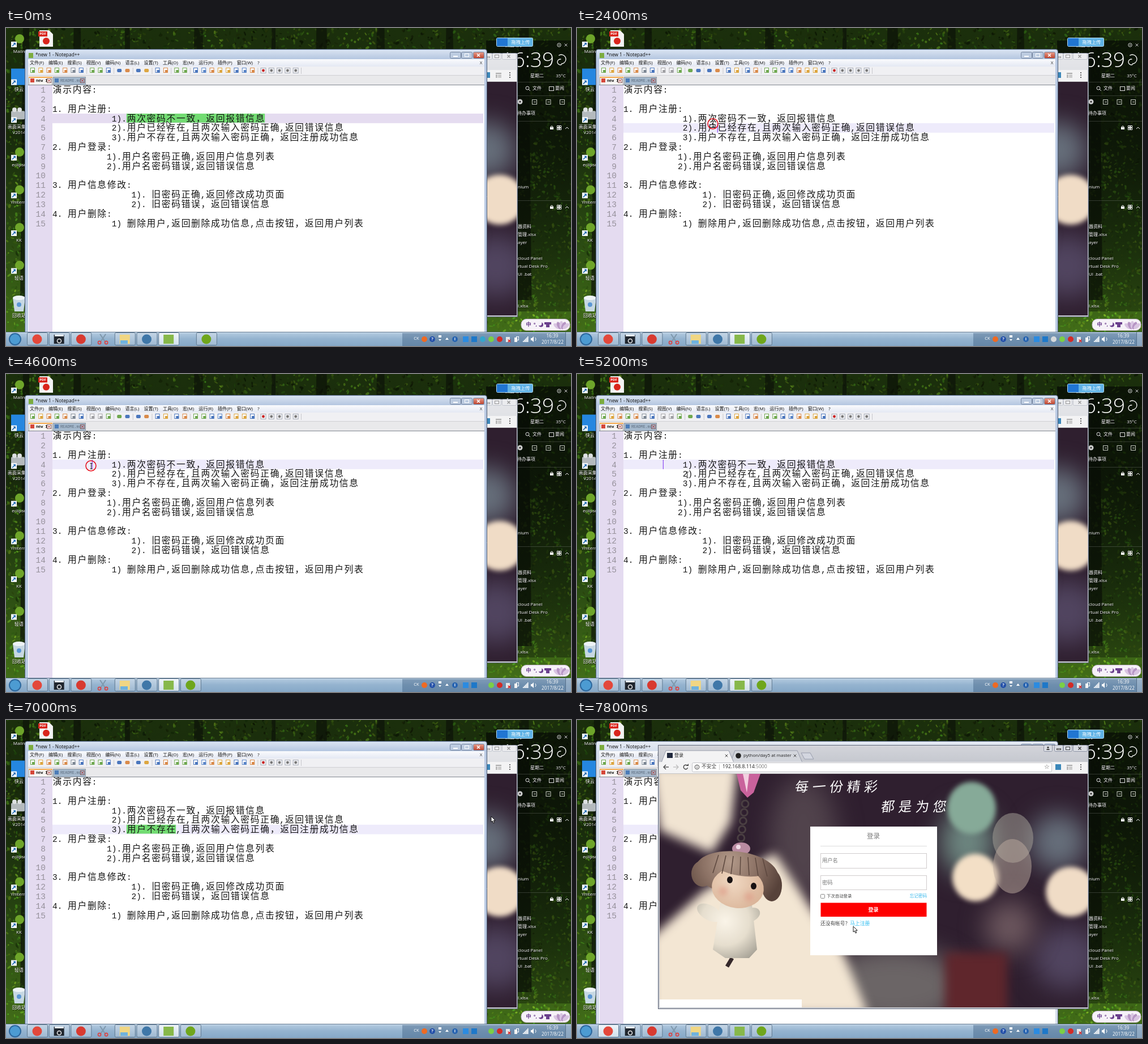
Write an HTML page with a canvas that moves like this. It is 998x561 px and loops after 8000 ms.

```html
<!DOCTYPE html>
<html lang="zh-CN">
<head>
<meta charset="utf-8">
<style>
html, body { margin: 0; width: 100%; height: 100%; overflow: hidden; background: #1c3010; }
canvas { display: block; width: 100vw; height: 100vh; }
</style>
</head>
<body>
<canvas id="stage" width="998" height="561"></canvas>
<script>
const W = 998, H = 561, LOOP = 8000, STEP = 200;
const UI = '"Open Sans", "Noto Sans CJK SC", "Noto Sans CJK", sans-serif';
const MONO = '"Liberation Mono", "Noto Sans CJK SC", "Noto Sans CJK", monospace';
const CELL = 8.725, ROW = 16.82, LEFT = 82, TOP = 100.6;
let g = document.getElementById('stage').getContext('2d');

// ---- helpers ----
function rect(x, y, w, h, c) { g.fillStyle = c; g.fillRect(x, y, w, h); }
function frame(x, y, w, h, c) { g.strokeStyle = c; g.lineWidth = 1; g.strokeRect(x + .5, y + .5, w - 1, h - 1); }
function oval(x, y, rx, ry, c, turn = 0) {
  g.fillStyle = c; g.beginPath(); g.ellipse(x, y, rx, ry, turn, 0, 7); g.fill();
}
function dot(x, y, r, c) { oval(x, y, r, r, c); }
function arc(x, y, r, c, w = 1, from = 0, to = 7) {
  g.strokeStyle = c; g.lineWidth = w; g.beginPath(); g.arc(x, y, r, from, to); g.stroke();
}
function trace(p) {
  g.beginPath();
  for (let i = 0; i < p.length; i += 2) g.lineTo(p[i], p[i + 1]);
}
function line(c, w, ...p) { g.strokeStyle = c; g.lineWidth = w; trace(p); g.stroke(); }
function poly(c, ...p) { g.fillStyle = c; trace(p); g.fill(); }
function round(x, y, w, h, r, c, edge) {
  g.beginPath(); g.roundRect(x, y, w, h, r);
  g.fillStyle = c; g.fill();
  if (edge) { g.strokeStyle = edge; g.lineWidth = 1; g.stroke(); }
}
function cross(x, y, r, c, w = 1) {
  line(c, w, x - r, y - r, x + r, y + r);
  line(c, w, x - r, y + r, x + r, y - r);
}
function text(s, x, y, size, c, align = 'left', weight = 400, family = UI) {
  g.font = `${weight} ${size}px ${family}`;
  g.textAlign = align; g.textBaseline = 'middle'; g.fillStyle = c;
  g.fillText(s, x, y);
  return g.measureText(s).width;
}
function label(s, x, y, align = 'center') {
  text(s, x + .6, y + .8, 8, '#000', align);
  text(s, x, y, 8, '#fff', align);
}
function stops(q, colors) {
  colors.forEach((c, i) => q.addColorStop(i / (colors.length - 1), c));
  return q;
}
function ramp(y0, y1, ...colors) { return stops(g.createLinearGradient(0, y0, 0, y1), colors); }
function ball(x, y, r, ...colors) { return stops(g.createRadialGradient(x, y, 0, x, y, r), colors); }
function blurred(px, draw) { g.save(); g.filter = `blur(${px}px)`; draw(); g.restore(); }
function randomizer(seed) { return () => (seed = (seed * 16807) % 2147483647) / 2147483647; }
function cached(draw) {
  const c = document.createElement('canvas'), old = g;
  c.width = W; c.height = H;
  g = c.getContext('2d'); draw(); g = old;
  return c;
}

// ---- desktop ----
function forest() {
  const rnd = randomizer(77);
  rect(0, 0, W, H, ramp(0, H, '#1b2f0c', '#182a0c', '#2a4a12', '#457219'));
  for (let i = 0; i < 9000; i++) {
    const x = rnd() * W, y = rnd() * H, patch = Math.sin(x / 31) * Math.sin(y / 37 + x / 90);
    const light = 15 + y / 32 + 9 * patch + (rnd() - .5) * 24;
    oval(x, y, 1 + rnd() * 3, .8 + rnd() * 1.6, `hsla(${80 + rnd() * 22},68%,${Math.max(4, light)}%,.7)`, rnd() * 3);
  }
  for (let x = 30; x < W; x += 50 + rnd() * 100) {
    const w = 6 + rnd() * 14;
    poly('rgba(12,18,8,.7)', x, 0, x + w, 0, x + w + 5, 480, x - 5, 480);
  }
}
function desktopIcons() {
  const names = ['Mailn', '快云', '画面采集大', 'eclipse', 'Ymterm', 'KK', '轻语', '回收站'];
  names.forEach((name, i) => {
    const y = 19 + i * 66.6;
    if (i === 1) rect(9, y - 14, 24, 29, '#2587e0');
    else if (i === 2) { round(9, y - 6, 24, 15, 2, '#b4babd'); dot(15, y - 8, 4, '#dde0e2'); dot(24, y - 8, 4, '#dde0e2'); }
    else if (i === 7) { poly('#c7d8e2', 12, 476, 34, 476, 31, 500, 15, 500); oval(23, 476, 11, 4, '#edf3f6'); dot(23, 488, 4, '#5b97d4'); }
    else dot(24, y, 8, '#6ea52a');
    if (i < 7) {
      rect(9, y + 5, 10, 10, '#f4f8fc');
      line('#1f68b0', 1.6, 11, y + 13, 16, y + 8);
      poly('#1f68b0', 12.5, y + 7, 17, y + 7, 17, y + 11.5);
    }
    label(name, 23, y + 23);
  });
  label('V2014', 23, 185);
  poly('#f3f3f3', 59, 4, 76, 4, 83, 11, 83, 33, 59, 33);
  rect(57, 6, 16, 9, '#d9251c'); text('PDF', 65, 10.5, 6, '#fff', 'center', 700);
  dot(71, 23, 6, '#d9251c');
}
function sidePanel() {
  rect(848, 22, 150, 478, ramp(22, 500, 'rgba(5,9,4,.7)', 'rgba(5,9,4,.55)', 'rgba(5,9,4,.35)'));
  text('16:39', 968, 59, 37, '#fff', 'right', 300, '"Open Sans", sans-serif');
  arc(977, 30, 3.2, '#ddd'); dot(977, 30, 1, '#ddd'); cross(989, 30, 2.4, '#ccc');
  arc(981, 55, 8, '#fff', 1.3, -2.2, 1.6); arc(979, 60, 5, '#fff', 1.3, 1, 5);
  label('星期二', 938, 85); label('35°C', 980, 85);
  arc(921, 106, 3, '#ddd'); line('#ddd', 1, 923, 108, 926, 111);
  label('文件', 938, 107);
  frame(959, 103, 9, 8, '#ddd'); label('要闻', 978, 107);
  for (const y of [95, 119, 164, 304]) rect(848, y, 150, 1, 'rgba(255,255,255,.16)');
  dot(908, 130, 4.5, '#ccc'); dot(908, 130, 1.5, '#222');
  for (let x = 929; x < 980; x += 24.5) { frame(x, 126, 9, 9, '#c4c8c0'); rect(x + 3, 130, 4, 1, '#ccc'); }
  label('待办事项', 919, 151);
  for (const y of [176, 316]) {
    rect(961, y - 1, 6, 4, '#fff'); arc(964, y - 1, 2, '#fff');
    for (let i = 0; i < 4; i++) frame(973 + i % 2 * 4, y - 4 + (i >> 1) * 4, 4, 4, '#eee');
    line('#eee', 1, 988, y + 2, 991, y - 1, 994, y + 2);
  }
  'nium/////器资料/管理.xlsx/ayer//cloud Panel/rtual Desk Pro/UI .bat////l.xlsx'.split('/')
    .forEach((s, i) => label(s, 904, 281 + i * 14, 'left'));
}
function floaters() {
  label('桌面助手', 898, 31);
  round(866.5, 17.5, 64, 15, 2, '#5fb2e6', '#b7dcf2');
  rect(867, 18, 19, 14, '#2176d2');
  text('拖拽上传', 909, 25.5, 8.2, '#fff', 'center');
  round(910, 513.5, 86, 20, 9, '#f6f2f8', '#c5b6cc');
  text('中', 923, 523.5, 9.5, '#6b3f8d', 'center', 700);
  text('°,', 935, 524, 9, '#6b3f8d', 'center', 700);
  dot(945, 523.5, 4, '#6b3f8d'); dot(943, 521.5, 3.4, '#f6f2f8');
  rect(951, 519, 12, 4, '#6b3f8d'); rect(954, 519, 6, 9, '#6b3f8d');
  for (let i = -2; i <= 2; i++) oval(981 + i * 4, 524 + Math.abs(i), 3.4, 7, i % 2 ? '#b695c4' : '#d9c4e2', i * .45);
}

// ---- browser ----
function photo() {
  g.save();
  g.beginPath(); g.rect(146, 95, 756, 412); g.clip();
  rect(146, 95, 756, 412, '#2f1f2f');
  blurred(22, () => {
    oval(400, 210, 60, 110, '#51434c');
    oval(560, 470, 130, 70, '#6b6566');
    oval(850, 215, 50, 50, '#67707c');
    oval(865, 420, 60, 55, '#514560');
    oval(765, 365, 45, 45, '#6c575e');
    oval(690, 215, 48, 60, '#6d8680');
  });
  blurred(9, () => {
    poly('#f1e4d2', 130, 80, 284, 80, 272, 180, 238, 235, 146, 195);
    poly('#f3e6d3', 130, 385, 225, 300, 350, 235, 412, 330, 470, 410, 515, 520, 130, 520);
    rect(650, 410, 110, 110, '#5f262c');
  });
  blurred(4, () => {
    oval(697, 155, 43, 46, '#86aa98');
    oval(704, 278, 41, 42, '#f3dfc6');
    oval(872, 303, 44, 44, '#f0dcc6');
  });
  oval(770, 208, 36, 44, 'rgba(170,165,156,.5)');
  oval(769, 258, 34, 48, 'rgba(190,172,160,.5)');
  doll();
  g.restore();
}
function doll() {
  const skin = ball(275, 285, 60, '#f0d8c2', '#d9b397'), eye = '#171112';
  const hair = ball(270, 250, 95, '#b39a8a', '#8c7265', '#57423a');
  const cloth = ball(262, 355, 85, '#faf4e8', '#e6dece', '#99958a');
  poly('#c9629c', 282, 95, 324, 95, 312, 128, 301, 137, 289, 124);
  poly('#f3cfe0', 293, 95, 304, 95, 300, 128);
  for (let i = 0; i < 5; i++) arc(297 - i * 1.8, 148 + i * 15, 6, '#4a3f42', 3);
  oval(290, 227, 16, 11, '#b98ba1'); dot(285, 224, 4, '#f0dce6');
  line('#34282a', 7, 265, 435, 274, 420);
  poly(cloth, 254, 318, 308, 318, 318, 405, 304, 420, 262, 420, 240, 405);
  oval(234, 340, 24, 13, cloth, .5); oval(306, 344, 18, 12, cloth, -.4);
  oval(282, 270, 74, 38, hair, .12);
  oval(222, 271, 20, 23, hair); oval(344, 292, 18, 28, hair);
  oval(284, 296, 46, 36, skin, .1);
  oval(290, 255, 52, 20, hair, .15);
  for (let i = 0; i < 7; i++) line('#5d483f', 1.5, 250 + i * 13, 238 + i, 240 + i * 16, 270 + i);
  oval(270, 282, 5, 6, eye); oval(312, 293, 5, 6, eye);
  blurred(5, () => { dot(258, 302, 8, 'rgba(222,150,130,.6)'); dot(304, 312, 8, 'rgba(222,150,130,.6)'); });
}
function handwriting(s, x, y) {
  [...s].forEach((ch, i) => {
    g.save(); g.translate(x + i * 30.5, y); g.transform(1, -.08, -.12, 1, 0, 0);
    text(ch, 0, 0, 24, '#fff', 'center', 300); g.restore();
  });
}
function tab(x, w, title, c) {
  const p = [x, 75, x + 8, 54, x + w - 9, 54, x + w, 75];
  poly(c, ...p); line('#989dac', 1, ...p);
  text(title, x + 23, 63, 8, '#222');
  if (title) cross(x + w - 13, 63, 2.3, '#444');
}
function field(y, h, hint) { frame(430, y, 188, h, '#d0cccd'); text(hint, 433, y + 13.5, 9.3, '#777'); }
function browserWindow() {
  const ink = '#444';
  rect(143, 44, 761, 466, '#60687a');
  rect(144, 45, 759, 464, ramp(45, 75, '#d3d4da', '#c5c8cf'));
  for (const x of [824, 843, 859, 876]) round(x + .5, 44.5, x > 870 ? 25 : 15, 11, 2, '#d9dce2', '#8e94a6');
  dot(832, 48.5, 1.7, ink); rect(829.5, 51, 5, 2, ink);
  frame(847, 50, 8, 3, ink); frame(863, 47, 8, 6, ink); cross(888, 50, 2.5, ink, 1.4);
  tab(271, 127, 'python/day5 at master', '#d3d6dc'); dot(285, 63, 4.8, '#222');
  tab(149, 128, '登录', '#f3f3f4'); rect(159, 58, 10, 9, '#20283c');
  poly('#d3d6df', 396, 58, 412, 58, 418, 69, 402, 69); line('#989dac', 1, 396, 58, 412, 58, 418, 69, 402, 69, 396, 58);
  rect(145, 74, 757, 21, '#f3f3f4');
  rect(145, 94, 757, 1, '#c6c6c8');
  for (const d of [1, -1]) {
    const x = 166 - 13 * d, c = d > 0 ? ink : '#bbb';
    line(c, 1.3, x, 83, x + 9 * d, 83); line(c, 1.3, x + 4 * d, 79, x, 83, x + 4 * d, 87);
  }
  arc(192, 83, 3.7, ink, 1.4, .3, 5.4); poly(ink, 193, 81, 197, 81, 197, 77);
  round(203.5, 75.5, 635, 16, 2, '#fff', '#c2c3c8');
  arc(212, 83, 3.8, ink); rect(211.5, 82, 1, 3, ink); rect(211.5, 80.5, 1, 1, ink);
  text('不安全', 220, 83, 8.7, ink); rect(251, 78, 1, 10, '#ccc');
  const host = text('192.168.8.114', 257, 83, 8.7, '#222');
  text(':5000', 257 + host, 83, 8.7, '#777');
  text('☆', 830, 83, 11, '#555', 'center', 400, '"DejaVu Sans", sans-serif');
  rect(845, 78, 10, 10, '#3b87b9');
  rect(865, 79, 10, 2, '#aaa'); rect(865, 82, 3, 6, '#bbb'); rect(869, 82, 6, 6, '#ccc');
  for (const y of [79, 83, 87]) dot(890, y, 1.1, ink);
  photo();
  handwriting('每一份精彩', 397, 120);
  handwriting('都是为您', 549, 155);
  rect(412, 188, 224, 227, '#fff');
  text('登录', 523.5, 206, 11.5, '#777', 'center');
  rect(430, 222, 188, 1, '#ddd');
  field(235, 27, '用户名'); field(274, 26, '密码');
  round(430.5, 307.5, 7, 7, 1, '#fff', '#888');
  text('下次自动登录', 441, 311.5, 7.4, ink);
  text('忘记密码', 618, 311.5, 7.6, '#38b8ec', 'right');
  rect(430.5, 322.5, 187, 24.5, '#fe0000');
  text('登录', 523.5, 335.5, 9, '#fff', 'center', 700);
  text('还没有帐号？', 430, 360, 8.7, ink);
  text('马上注册', 482, 360, 8.9, '#2cbcf0');
}

// ---- editor ----
const content = `演示内容:

1. 用户注册:
            1).两次密码不一致，返回报错信息
            2).用户已经存在,且两次输入密码正确,返回错误信息
            3).用户不存在,且两次输入密码正确，返回注册成功信息
2. 用户登录:
           1).用户名密码正确,返回用户信息列表
           2).用户名密码错误,返回错误信息

3. 用户信息修改:
                1). 旧密码正确,返回修改成功页面
                2). 旧密码错误，返回错误信息
4. 用户删除:
            1) 删除用户,返回删除成功信息,点击按钮，返回用户列表`.split('\n');
const menus = '文件(F) 编辑(E) 搜索(S) 视图(V) 编码(N) 语言(L) 设置(T) 工具(O) 宏(M) 运行(R) 插件(P) 窗口(W) ?'.split(' ');
const toolGroups = [7, 3, 2, 2, 2, 2, 8, 5];

function toolbar(sel) {
  const tones = ['#6fa84f', '#dda640', '#4a76bd', '#5b86c8', '#d98a4a', '#7d8794'], rnd = randomizer(9);
  let x = 47;
  toolGroups.forEach((count, group) => {
    for (let i = 0; i < count; i++, x += 14.3) {
      const c = group === 1 && i < 2 && !sel ? '#a0a0a4' : tones[Math.floor(rnd() * 6)];
      if (group === 7) { frame(x - 5, 70, 10, 10, '#a8aeba'); dot(x, 75, 2.4, i ? '#777' : '#c81e1e'); }
      else if (group === 2 || group === 3) round(x - 4, 72, 8, 6, 2, c);
      else { rect(x - 4, 70, 8, 9, '#fbfbfd'); frame(x - 4, 70, 8, 9, c); rect(x - 1, 74, 5, 5, c); }
    }
    rect(x - 5, 70, 1, 11, '#c8c8cc');
    x += 5.1;
  });
}
function fileTab(x, w, name, c, mark, ink, weight) {
  rect(x, 86, w, 14, c); frame(x, 86, w, 15, '#9399a0');
  rect(x + 3, 89, 7, 7, mark);
  text(name, x + 13, 93, 6.8, ink, 'left', weight, MONO);
  frame(x + w - 10, 89, 8, 8, '#8a5a5a'); cross(x + w - 6, 93, 2, '#b34040');
}
function winButton(x, hot) {
  round(x + .5, 42.5, 19, 11, 2, hot ? ramp(43, 54, '#e69a88', '#bc3c26') : '#bccbe0', '#7485a0');
}
function editor({ row, from, to, front }) {
  const sel = to > from, y0 = TOP + row * ROW;
  round(33.5, 37.5, 816, 520, 4, front ? '#b9c9e2' : '#d3dbea', '#4d5c74');
  rect(35, 39, 813, 16, front ? ramp(39, 55, '#d9e3f1', '#b4c6e0') : ramp(39, 55, '#e6ebf4', '#d5deec'));
  rect(40, 44, 8, 9, '#7cac3f');
  text('*new 1 - Notepad++', 52, 48, 8.4, '#111');
  for (const x of [784, 804, 825]) winButton(x, front && x > 820);
  rect(790, 49, 8, 2, '#fff'); frame(810, 45, 8, 6, '#fff'); cross(834.5, 48, 2.5, '#fff', 1.6);
  rect(39, 55, 806, 45, '#f0f0f3');
  rect(39, 55, 806, 13, ramp(55, 68, '#fafbfd', '#e4e8f3'));
  let x = 42;
  for (const m of menus) x += text(m, x, 61.5, 8, '#111') + 8.2;
  text('X', 839, 61.5, 8, '#333', 'center');
  toolbar(sel);
  rect(39, 83, 806, 17, '#e9e9eb'); rect(39, 83, 806, 1, '#d0d0d4');
  fileTab(40, 42, 'new 1', '#f7f5f3', '#d5473a', '#111', 700);
  rect(40, 86, 42, 2, '#f5a94c');
  fileTab(83, 58, 'README.md', '#a4b8cc', '#4b7cb8', '#5f6f80', 400);

  rect(39, 100, 806, 437, '#fff'); rect(39, 100, 806, 1, '#808690');
  rect(40, 101, 42, 436, '#e4dbf0');
  rect(LEFT, y0, 761, ROW, sel && row === 3 ? '#e5dcf0' : '#eeebfb');
  if (sel) rect(LEFT + from * CELL, y0, (to - from) * CELL, ROW - 1, '#72dc72');
  content.forEach((s, i) => {
    const y = TOP + i * ROW + 13.5;
    let col = 0;
    g.textBaseline = 'alphabetic'; g.fillStyle = '#96919b';
    g.font = `14.5px ${MONO}`; g.textAlign = 'right';
    g.fillText(i + 1, 70, y);
    g.textAlign = 'left'; g.fillStyle = '#161616';
    for (const ch of s) {
      const wide = ch > '~';
      g.font = `${wide ? 15.8 : 14.5}px ${MONO}`;
      g.fillText(ch, LEFT + col * CELL + (wide ? .8 : 0), y);
      col += wide ? 2 : 1;
    }
  });
  if (!sel) rect(LEFT + from * CELL, y0, 1, ROW, '#7a2cf0');
}

// ---- taskbar ----
function taskButton(x, active) {
  round(x + .5, 537.5, 36, 22, 2, active ? ramp(537, 560, '#f1f6fa', '#cfdfeb') : ramp(537, 560, '#c5d6e6', '#9db8d1'), '#60788f');
}
function badge(s, x, c) { dot(x, 549, 5, c); text(s, x, 549, 7.5, '#fff', 'center', 700); }
function taskbar(t, front) {
  rect(0, 536, W, 25, ramp(536, 561, '#b8cee2', '#94b3cf', '#86a8c7'));
  rect(700, 536, 298, 25, 'rgba(48,82,118,.38)');
  rect(0, 536, W, 1, '#57708a'); rect(0, 537, W, 1, '#d0e0ee');
  dot(16, 549, 11, '#2d679d'); dot(16, 549, 9, '#4c9bd2');
  const icons = ['#e3483b', '#20262e', '#d83a30', '', '#f0d683', '#3f77a8', '#87b84a', '#6fa61c'];
  icons.forEach((c, i) => {
    const x = 37 + i * 38.7 + (i === 7 && t < 200 ? 28 : 0), mid = x + 18;
    if (c) taskButton(x, i === (front ? 6 : 0));
    if (i === 1 || i === 4 || i === 6) rect(mid - 9, 541, 18, 16, c);
    else if (c) dot(mid, 549, 8.5, c);
    else for (const d of [-1, 1]) {
      line('#7f98ac', 2, mid + 5 * d, 540, mid - 5 * d, 555);
      arc(mid - 6 * d, 555, 2.6, '#d44', 1.6);
    }
  });
  rect(86, 541, 16, 3, '#e9eef3'); arc(94, 552, 3.5, '#eee', 1.5); rect(202, 551, 13, 6, '#6fb2dd');

  text('CK', 725, 548, 7.5, '#fff', 'center');
  badge('', 739, '#ee6a23'); badge('?', 753, '#2450a8'); badge('i', 793, '#2864b0');
  rect(764, 542, 5, 4, '#fff'); poly('#fff', 764, 549, 769, 549, 766.5, 552);
  poly('#fff', 776, 550, 782, 550, 779, 546);
  rect(807, 544, 10, 10, '#2c8be0'); rect(822, 544, 10, 10, '#1f78c8');
  if (t % 800 < 400) badge('', 842, Math.floor(t / 800) === 3 ? '#d5d8da' : '#35a5cc');
  badge('', 857, '#7bcf45'); badge('', 872, '#d42a25');
  rect(883, 545, 7, 9, '#e6e6e6'); cross(889, 552, 2.3, '#d22', 1.5);
  rect(898, 546, 5, 8, '#f1f1f1'); frame(901, 544, 5, 7, '#fff');
  for (let i = 0; i < 5; i++) rect(913 + i * 2, 552 - i * 2, 1.5, 2 + i * 2, '#fff');
  poly('#fff', 927, 547, 929, 547, 932, 544, 932, 554, 929, 551, 927, 551);
  arc(932, 549, 4, '#fff', 1, -.8, .8);
  text('16:39', 965, 543.5, 8.2, '#fff', 'center');
  text('2017/8/22', 965.5, 554.5, 8.2, '#fff', 'center');
  rect(989, 537, 9, 24, 'rgba(220,235,248,.3)'); rect(988, 537, 1, 24, '#566f8a');
}

// ---- motion ----
// Pointer stops; a held button shows the red ring until the next stop.
const stopsAt = [
  { t: 0, x: 284, y: 164 },
  { t: 1400, x: 240, y: 148, held: true }, { t: 1600, x: 240, y: 148 }, { t: 1800, x: 240, y: 148 },
  { t: 2400, x: 240, y: 169, held: true }, { t: 3200, x: 317, y: 176 },
  { t: 4600, x: 150, y: 162, held: true }, { t: 4800, x: 154, y: 165 },
  { t: 5800, x: 255, y: 196, held: true }, { t: 6000, x: 300, y: 195, held: true }, { t: 6600, x: 214, y: 195 },
  { t: 7000, x: 857, y: 170 }, { t: 7200, x: 855, y: 172 }, { t: 7800, x: 488, y: 364 }
];
// Current row and selected columns; equal columns mean a bare caret.
const edits = [
  { t: 0, row: 3, from: 15, to: 43 }, { t: 1400, row: 2, from: 12, to: 12 },
  { t: 2200, row: 4, from: 19, to: 19 }, { t: 2800, row: 4, from: 19, to: 27 },
  { t: 4400, row: 3, from: 8, to: 8 }, { t: 5600, row: 5, from: 19, to: 19 }, { t: 6400, row: 5, from: 15, to: 25 }
];
function latest(list, t) { return list.findLast(k => k.t <= t); }
function stateAt(t) {
  const a = latest(stopsAt, t), b = stopsAt[stopsAt.indexOf(a) + 1] || a;
  const k = b === a ? 0 : (t - a.t) / (b.t - a.t);
  return {
    ...latest(edits, t), front: t < 7200, held: a.held,
    x: a.x + (b.x - a.x) * k, y: a.y + (b.y - a.y) * k
  };
}
function pointer({ x, y, front, held, row, from, to }) {
  if (held) arc(x, y, 9, '#e50b18', 1.5);
  const col = (x - LEFT) / CELL, onSel = Math.floor((y - TOP) / ROW) === row && col > from && col < to;
  if (front && x < 843 && (held || !onSel)) {
    line('#222', 1, x + .5, y - 4, x + .5, y + 5);
    for (const d of [-4.5, 5.5]) line('#222', 1, x - 1.5, y + d, x + 2.5, y + d);
    return;
  }
  const p = [0, 0, 0, 10, 2.3, 8, 4, 12, 5.8, 11.2, 4.1, 7.3, 7.2, 7.2, 0, 0].map((v, i) => v + (i % 2 ? y : x));
  poly('#fff', ...p); line('#000', .9, ...p);
}

const desktop = cached(() => { forest(); sidePanel(); desktopIcons(); });
const browser = cached(browserWindow);

function draw(t) {
  const s = stateAt(t);
  g.drawImage(desktop, 0, 0);
  if (s.front) {
    g.drawImage(browser, 0, 0);
    rect(849, 45, 54, 29, 'rgba(255,255,255,.45)');
  }
  editor(s);
  if (!s.front) g.drawImage(browser, 0, 0);
  if (t >= 7800) rect(146, 493, 251, 14, '#fff');
  floaters();
  taskbar(t, s.front);
  pointer(s);
}

let start, shown = -1;
function tick(now) {
  start ??= now;
  const t = Math.floor(((now - start) % LOOP) / STEP) * STEP;
  if (t !== shown) draw(shown = t);
  requestAnimationFrame(tick);
}
draw(0);
requestAnimationFrame(tick);
</script>
</body>
</html>
```
